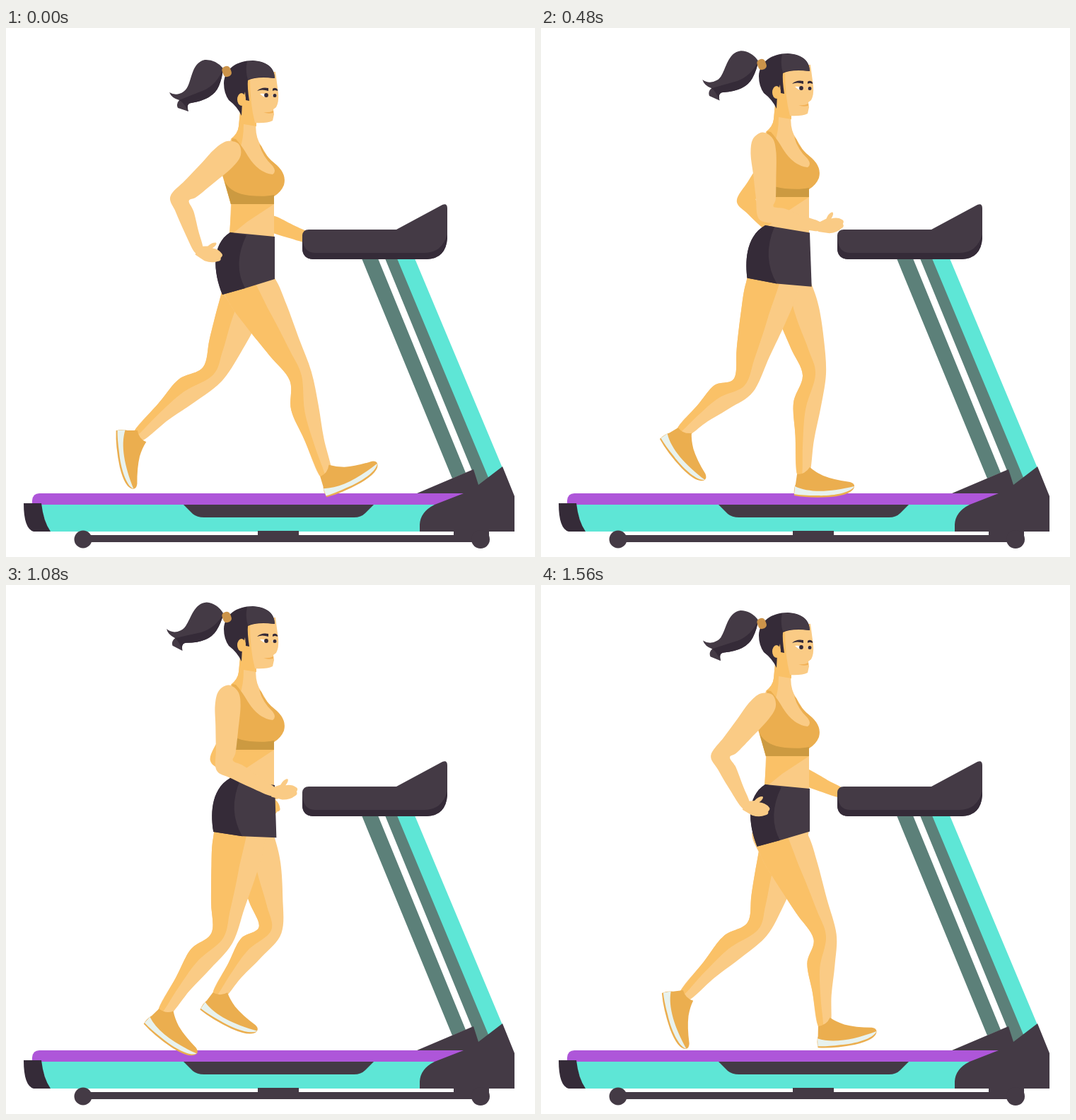
These frames come from a looping animation (748x748 px, 1600 ms). An HTML page:

```html
<!DOCTYPE html>
<html lang="en">
<head>
<meta charset="utf-8">
<title>Treadmill</title>
<style>
html, body { margin: 0; width: 100%; height: 100%; overflow: hidden; background: #fff; }
svg { display: block; width: 100vw; height: 100vh; }
.skin { fill: #facb85; }
.tan { fill: #fac167; }
.cloth { fill: #ebae4f; }
.band { fill: #cc9a41; }
.dark { fill: #443a45; }
.deep { fill: #352b38; }
.teal { fill: #5ee6d6; }
.steel { fill: #5c8079; }
</style>
</head>
<body>
<svg viewBox="0 0 748 748">
  <defs>
    <g id="shoe">
      <path class="cloth" d="M-8-1L-10 13Q-13 20-12 29Q10 33 40 31Q70 28 73 17Q74 12 67 10Q44 7 29 1Q18-4 10-11Q4-1-8-1Z"/>
      <path fill="#e8f2ee" d="M-11 16C10 26 40 24 73 16C68 26 40 30 20 29Q0 29-12 27Z"/>
    </g>
    <path id="hand" d="M-4-6Q6-9 10-10Q14-17 20-18Q23-16 17-9Q26-10 32-5Q35-3 32 1Q34 5 29 7Q22 12 11 11L-4 6Z"/>
  </defs>

  <g id="farArm" class="tan"></g>

  <g id="machine">
    <path class="steel" d="M503 326H526L650 629L631 637ZM536 326H554L684 637L668 648Z"/>
    <path class="teal" d="M553 326H578L702 622L683 638Z"/>
    <path class="teal" d="M48 674H612L586 712H60Z"/>
    <path fill="#ae56d9" d="M37 674V668Q38 658 47 658H655L620 674Z"/>
    <path class="dark" d="M581 658L661 624L668 646L702 620L719 662V712H585V702Q586 684 606 674L647 658Z"/>
    <path class="deep" d="M25 672H50Q53 698 63 712H39Q25 708 25 672Z"/>
    <path class="dark" d="M251 674H520L508 686Q502 692 492 692H280Q270 692 264 687Z"/>
    <path class="dark" d="M356 711H414V717H633V711H683V727H110V717H356Z"/>
    <circle class="dark" cx="109" cy="723" r="12.5"/>
    <circle class="dark" cx="671" cy="723" r="13"/>
    <path class="dark" d="M419 293Q420 285 428 285H552L617 250Q624 247 624 255V297Q622 326 595 327H434Q419 326 419 311Z"/>
    <path class="deep" d="M419 293Q419 318 437 318H592Q616 318 624 292V297Q622 326 595 327H434Q419 326 419 311Z"/>
  </g>

  <g id="farLeg"></g>

  <g id="torso">
    <path class="skin" d="M331 118L329 139Q328 149 318 157L305 200L318 250L316 300H379V238L390 215L361 167Q351 152 354 132Z"/>
    <path class="tan" d="M319 249H379L341 274L320 291H316Z"/>
    <path class="tan" d="M331 118L329 139Q328 149 318 157Q327 162 331 170Q336 156 336 136L354 139V130Z"/>
    <path class="cloth" d="M320 156L325 157Q334 167 342 181Q357 205 377 207Q383 203 377 195Q363 182 358 164L361 167Q366 181 383 194Q397 207 393 222Q389 232 379 238V249H318L305 205Z"/>
    <path class="band" d="M309 217Q318 234 345 237Q366 239 379 236V249H318Z"/>
    <path class="skin" d="M341 62H381L385 92Q386 105 382 112L378 115L379 122L377 131Q369 135 352 134L331 116L334 80Z"/>
    <path class="tan" d="M338 70H345Q345 108 352 134L346 137L331 122Z"/>
    <path class="deep" d="M308 78C309 58 326 46 349 46C367 47 380 55 380 71Q354 68 342 74Q341 83 344 103L339 102L338 90L334 105L333 124Q327 111 315 102Q308 92 308 78Z"/>
    <path class="dark" d="M341 47Q378 44 380 71Q355 67 342 73Q338 60 341 47Z"/>
    <ellipse class="tan" cx="333" cy="101" rx="6" ry="9"/>
    <path class="deep" d="M355 89Q361 83 371 85V89Q362 86 355 89ZM377 86Q381 83 384 87V89Q380 87 377 89Z"/>
    <path fill="#fff" d="M359 93Q365 92 371 95Q368 98 364 97ZM376 95Q380 93 383 95L382 97H378Z"/>
    <circle class="deep" cx="368" cy="95" r="2.9"/>
    <circle class="deep" cx="380" cy="95.5" r="2.5"/>
    <path fill="#f2b157" d="M364 119Q372 120 378 117V120Q370 122 364 119Z"/>
    <g id="tail">
      <path class="dark" d="M307 57Q296 44 281 45C259 50 264 82 251 90Q241 97 231 91Q234 99 245 102Q240 107 243 113L258 118Q254 107 262 106Q293 101 301 82Q306 70 307 57Z"/>
      <path class="deep" d="M307 57Q299 79 280 88Q262 95 245 102Q251 105 258 118Q254 107 262 106Q293 101 301 82Q306 70 307 57Z"/>
    </g>
    <rect fill="#cc944a" x="306" y="54" width="12" height="15" rx="5" transform="rotate(-20 312 61)"/>
  </g>

  <g id="nearLeg"></g>
  <path id="shorts" class="dark"/>
  <path id="shade" class="deep"/>
  <g id="nearArm" class="skin"></g>
</svg>
<script>
const NS = 'http://www.w3.org/2000/svg';
const $ = id => document.getElementById(id);
const CYCLE = 800, STEP = 40, RAD = Math.PI / 180;

function add(parent, tag, attrs) {
  const el = document.createElementNS(NS, tag);
  for (const k in attrs) el.setAttribute(k, attrs[k]);
  return parent.appendChild(el);
}

// Looping smooth curve through rows of [phase, ...values].
function loop(rows) {
  const n = rows.length;
  const at = i => {
    const turn = Math.floor(i / n), r = rows[i - turn * n];
    return [r[0] + turn, ...r.slice(1)];
  };
  return phase => {
    const p = phase - Math.floor(phase);
    let i = n - 1;
    while (rows[i][0] > p + 1e-9) i--;
    const [a, b, c, d] = [at(i - 1), at(i), at(i + 1), at(i + 2)];
    const h = c[0] - b[0], s = (p - b[0]) / h, s2 = s * s, s3 = s2 * s;
    return b.slice(1).map((v, j) => {
      const k = j + 1;
      const m0 = (c[k] - a[k]) / (c[0] - a[0]) * h;
      const m1 = (d[k] - b[k]) / (d[0] - b[0]) * h;
      return (2 * s3 - 3 * s2 + 1) * v + (s3 - 2 * s2 + s) * m0 +
        (3 * s2 - 2 * s3) * c[k] + (s3 - s2) * m1;
    });
  };
}

// Knee x, y, ankle x, y, shoe angle.
const stride = loop([
  [0, 417, 492, 452, 632, -25],
  [.1, 387, 490, 370, 632, 0],
  [.225, 330, 483, 284, 631, 4],
  [.35, 306, 499, 222, 605, 38],
  [.45, 306, 487, 202, 581, 75],
  [.5, 292, 490, 186, 577, 82],
  [.6, 287, 505, 198, 572, 51],
  [.725, 332, 498, 244, 569, 40],
  [.85, 374, 488, 299, 581, 29],
  [.95, 402, 497, 400, 624, -7]
]);

// Upper arm and forearm angles, measured forward from straight down.
const swing = loop([
  [0, -47, 20], [.35, -2.6, 61], [.5, 8, 82], [.6, 3, 75], [.95, -40, 27]
]);

// Vertical bounce, twice per cycle.
const bounce = loop([[0, 0], [.2, -10], [.47, -28], [.7, -16], [.9, -7]]);

// Smooth closed outline through points.
function outline(pts) {
  const n = pts.length, q = i => pts[(i + n) % n];
  const f = v => v.toFixed(1);
  let d = `M${f(pts[0][0])} ${f(pts[0][1])}`;
  for (let i = 0; i < n; i++) {
    const [a, b, c, e] = [q(i - 1), q(i), q(i + 1), q(i + 2)];
    d += 'C' + [b[0] + (c[0] - a[0]) / 6, b[1] + (c[1] - a[1]) / 6,
      c[0] - (e[0] - b[0]) / 6, c[1] - (e[1] - b[1]) / 6, c[0], c[1]].map(f).join(' ');
  }
  return d + 'Z';
}

// Two-part limb: at(bone, along, side) gives a point; side > 0 faces forward.
function limb(a, b, c) {
  const bones = [[a, b], [b, c]].map(([s, e]) => {
    const dx = e[0] - s[0], dy = e[1] - s[1], len = Math.hypot(dx, dy);
    return { s, dx, dy, nx: dy / len, ny: -dx / len };
  });
  const at = (i, t, w) => {
    const o = bones[i];
    return [o.s[0] + o.dx * t + o.nx * w, o.s[1] + o.dy * t + o.ny * w];
  };
  const joint = w => {
    const nx = bones[0].nx + bones[1].nx, ny = bones[0].ny + bones[1].ny;
    const l = Math.hypot(nx, ny);
    return [b[0] + nx / l * w, b[1] + ny / l * w];
  };
  return { at, joint };
}

// front: extra thigh width towards the front; seam: where the shading starts.
function makeLeg(id, base, front, seam) {
  const g = $(id);
  const skin = add(g, 'path', { class: 'skin' });
  const back = add(g, 'path', { class: 'tan' });
  const shoe = add(g, 'use', { href: '#shoe' });
  return (p, y) => {
    const [kx, ky, ax, ay, turn] = stride(p);
    const hip = [base - 12 * Math.cos(2 * Math.PI * p), 322 + y];
    const { at, joint } = limb(hip, [kx, ky], [ax, ay]);
    const rear = [at(1, 1, -8), at(1, .62, -17), at(1, .3, -25), joint(-17),
      at(0, .76, -24), at(0, .5, -32), at(0, .3, -36), at(0, .1, -30)];
    skin.setAttribute('d', outline([at(0, .1, 18 + front), at(0, .3, 25 + front),
      at(0, .5, 28 + front * .4), at(0, .76, 24), joint(16), at(1, .32, 14),
      at(1, .65, 10), at(1, 1, 9), ...rear]));
    back.setAttribute('d', outline([at(0, .1, seam), at(0, .5, seam), at(0, .8, 2 + seam / 3),
      joint(1), at(1, .35, -7), at(1, .7, -5), at(1, 1, -1), ...rear]));
    shoe.setAttribute('transform', `translate(${ax} ${ay}) rotate(${turn})`);
  };
}

function makeArm(id, sx, far) {
  const g = $(id);
  const arm = add(g, 'path', {});
  const hand = add(g, 'use', { href: '#hand' });
  return (p, y) => {
    let [up, fore] = swing(p);
    const turn = 24 - fore * .45 + (far ? 40 : 0);
    if (far) fore = 28 + fore / 2;
    const reach = (o, ang, len) => [o[0] + Math.sin(ang * RAD) * len, o[1] + Math.cos(ang * RAD) * len];
    const s = [sx, 178 + y], e = reach(s, up, 93), w = reach(e, fore, 79);
    const { at, joint } = limb(s, e, w);
    arm.setAttribute('d', outline([at(0, -.22, 0), at(0, -.12, 14), at(0, .1, 18),
      at(0, .5, 16), at(0, .8, 14), joint(13), at(1, .3, 12), at(1, .65, 9), at(1, 1, 6),
      at(1, 1, -6), at(1, .6, -10), at(1, .2, -12), joint(-14), at(0, .75, -14),
      at(0, .4, -16), at(0, .1, -18), at(0, -.12, -14)]));
    hand.setAttribute('transform', `translate(${w[0]} ${w[1]}) rotate(${turn})`);
  };
}

const farLeg = makeLeg('farLeg', 354, 0, -7), nearLeg = makeLeg('nearLeg', 331, 12, 7);
const farArm = makeArm('farArm', 345, true), nearArm = makeArm('nearArm', 314, false);

function drawShorts(p, y) {
  const c = (1 + Math.cos(2 * Math.PI * p)) / 2;
  const left = `${290 + 16 * c} ${362 + 15 * c}`;
  const mid = `${333 + 5 * c} ${372 - 4 * c}`;
  const side = `C${289 + 4 * c} 345 ${287 + 3 * c} 306 317 289`;
  $('shorts').setAttribute('d',
    `M317 289L380 ${300 - 5 * c}L${383 - 3 * c} ${378 - 23 * c}L${mid}L${left}${side}Z`);
  $('shade').setAttribute('d',
    `M317 289L${329 + 11 * c} ${291 + 2 * c}Q${311 + 9 * c} 334 ${mid}L${left}${side}Z`);
  for (const id of ['shorts', 'shade']) $(id).setAttribute('transform', `translate(0 ${y})`);
}

function draw(ms) {
  const p = Math.floor(ms / STEP) * STEP % CYCLE / CYCLE;
  const [y] = bounce(p * 2);
  farArm(p + .5, y);
  farLeg(p + .5, y);
  nearLeg(p, y);
  nearArm(p, y);
  drawShorts(p, y);
  $('torso').setAttribute('transform', `translate(0 ${y})`);
  $('tail').setAttribute('transform', `rotate(${-.57 * y} 310 60)`);
}

const start = performance.now();
function tick() {
  draw(performance.now() - start);
  requestAnimationFrame(tick);
}
tick();
</script>
</body>
</html>
```
